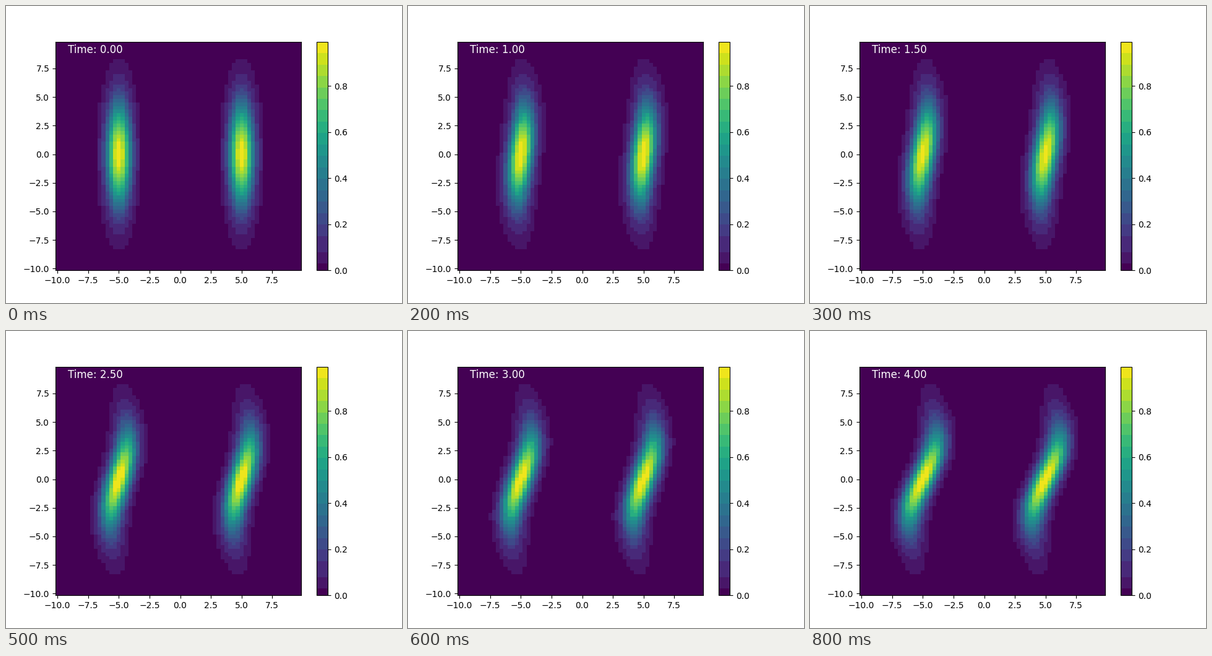
Write a matplotlib script that moves like this. It is 640 px wide and 480 px high and loops after 0.9 s.

```python
import math

import numpy as np
import matplotlib.pyplot as plt
from matplotlib.animation import FuncAnimation
from matplotlib.colors import ListedColormap

N = 64           # cells per side
SIZE = 20.0      # side of the periodic box
CENTRE = 5.0     # the two columns stand at -CENTRE and +CENTRE
SPREAD = 20.0    # squared height of a column
VMAX = 0.993
STEPS = 9
DT = 0.5

grid = -SIZE / 2 + SIZE / N * np.arange(N)
X, Y = np.meshgrid(grid, grid)


def drift(y):
    """Horizontal speed from the mean density, less its average over the box."""
    root = math.sqrt(SPREAD)
    half = math.sqrt(math.pi) * root / 2
    density = 2 * math.sqrt(math.pi) / SIZE
    inside = np.array([half * math.erf(v / root) for v in y])
    return density * (inside - 2 * half / SIZE * y)


SPEED = drift(grid)[:, None]


def field(t):
    x = X - SPEED * t
    total = np.zeros_like(X)
    for centre in (-CENTRE, CENTRE):
        d = (x - centre + SIZE / 2) % SIZE - SIZE / 2
        total += np.exp(-d ** 2 - Y ** 2 / SPREAD)
    return total


def banded_map(count=1000):
    """Viridis in flat bands."""
    edges = np.concatenate([[0, 0.03, 0.08], np.arange(3, 21) * 0.05])
    mids = (edges[:-1] + edges[1:]) / 2
    mids[0] = 0
    level = (np.arange(count) + 0.5) / count
    band = np.searchsorted(edges, level, side="right") - 1
    return ListedColormap(plt.get_cmap("viridis")(mids[band]))


fig, ax = plt.subplots(figsize=(6.4, 4.8), dpi=100)
mesh = ax.pcolormesh(X, Y, field(0), cmap=banded_map(), vmin=0, vmax=VMAX,
                     shading="nearest")
fig.colorbar(mesh, ax=ax)
label = ax.text(0.05, 0.95, "", color="white", fontsize=12,
                transform=ax.transAxes)


def update(i):
    t = i * DT
    mesh.set_array(field(t))
    label.set_text(f"Time: {t:.2f}")
    return mesh, label


anim = FuncAnimation(fig, update, frames=STEPS, interval=100, repeat=True,
                     repeat_delay=0)
plt.show()
```
